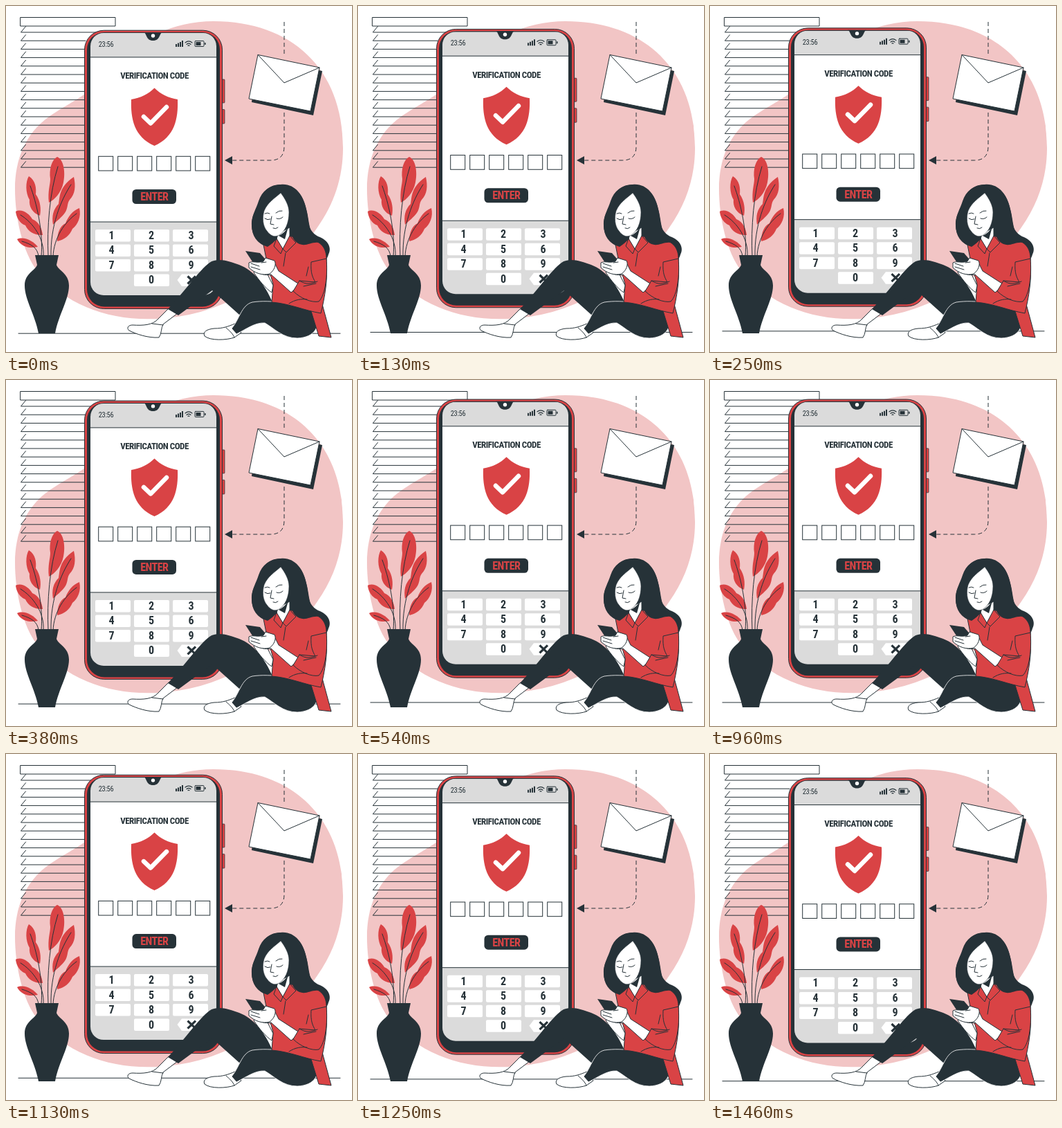
Recreate the animation shown at these times as an HTML page. Size 500 by 500 pixels, loop 1.5 s.

```html
<!DOCTYPE html>
<html lang="en">
<head>
<meta charset="utf-8">
<title>Verification code</title>
<style>
  html, body { margin: 0; width: 100%; height: 100%; overflow: hidden; background: #fff; }
  svg { display: block; width: 100vw; height: 100vh; }
  text { font-family: "Roboto Condensed", "Open Sans Condensed", "Noto Sans Condensed", Roboto, sans-serif; font-stretch: 75%; font-weight: 600; text-anchor: middle; fill: #263238; }
  .line { fill: none; stroke: #263238; stroke-linecap: round; stroke-linejoin: round; }
  .skin { fill: #fff; stroke: #263238; stroke-linejoin: round; }
  .red { fill: #d94345; }
  .dark { fill: #263238; }
  .white { fill: #fff; }
  .grey { fill: #dbdbdb; }
  .edge { stroke: #263238; }
</style>
</head>
<body>
<svg viewBox="0 0 500 500">
  <defs>
    <clipPath id="screen"><rect x="122" y="39" width="182" height="379" rx="19"/></clipPath>
  </defs>

  <path fill="#f2c5c5" d="M13 264C13 222 28 184 62 160C92 139 126 126 158 88C192 48 240 22 300 22C412 22 487 90 487 205C487 248 474 286 450 320C408 381 330 440 240 450C164 460 92 438 46 384C24 356 13 306 13 264Z"/>

  <g class="line">
    <path id="slats"/>
    <rect x="21" y="16.500" width="137" height="12.500" class="white"/>
  </g>

  <g id="floating">
    <path class="line" d="M18 473.200H483"/>
    <g class="red edge">
      <g stroke-width=".7">
        <rect x="308" y="106" width="8" height="34" rx="1"/>
        <rect x="308" y="149.500" width="8" height="20.500" rx="1"/>
      </g>
      <rect x="113.500" y="35.200" width="199" height="402.300" rx="28"/>
    </g>
    <rect class="dark" x="117" y="38" width="192" height="396.500" rx="25"/>
    <g clip-path="url(#screen)">
      <rect class="grey" x="122" y="39" width="182" height="380"/>
      <rect class="white edge" x="121" y="74" width="184" height="238"/>
    </g>
    <path class="dark" d="M199 38C204 40 202 50 212.500 50S221 40 226 38Z"/>
    <circle class="white" cx="212.500" cy="43" r="2.700"/>
    <text x="144.500" y="59" font-size="10.500" letter-spacing="-.3" style="font-weight:400">23:56</text>
    <path class="line" stroke-width="2" style="stroke-linecap:butt" d="M246 59v-4M249 59v-5.500M252 59v-7M255 59v-9"/>
    <path class="line" stroke-width="1.200" d="M259 53q5-4 10 0M261 55.500q3-2.500 6 0M263 57.500q1-1 2 0"/>
    <rect class="line" x="273" y="50.500" width="13" height="8" rx="1"/>
    <path class="dark" d="M274.500 52h7v5h-7zM287 53h1.500v3H287z"/>

    <text x="214.500" y="105.500" font-size="13" letter-spacing="-.5">VERIFICATION CODE</text>
    <path class="red" d="M214.500 118.500C206 127 194 133 181 135C180 163 185 189 214.500 202C244 189 249 163 248 135C235 133 223 127 214.500 118.500Z"/>
    <path d="M199 160L209 169.500L232 146" fill="none" stroke="#fff" stroke-width="6.500" stroke-linecap="round" stroke-linejoin="round"/>
    <g id="digits" class="white edge"></g>
    <rect class="dark" x="182.500" y="265" width="63.500" height="21" rx="5.500"/>
    <text x="214.300" y="281" font-size="16" letter-spacing="-.5" style="fill:#d94345">ENTER</text>
    <g id="keys"></g>
    <path class="white" d="M247.500 396L254 387.500H290q2 0 2 2V403q0 2-2 2H254Z"/>
    <path d="M262.500 390.500l11.500 11M274 390.500l-11.500 11" stroke="#263238" stroke-width="3.200"/>
  </g>

  <!-- Message -->
  <path class="line" stroke-dasharray="6 4" style="stroke-linecap:butt" d="M402 23V72M402 154V203Q402 223 382 223H326"/>
  <path class="dark" d="M316 223L327 217V229Z"/>
  <path class="dark" d="M364 71L457 94L444 158L355 139Z"/>
  <path class="skin" d="M364 70.500L453 89L440 152L351 134Z"/>
  <path class="line" d="M364 70.500L402 111L453 89"/>

  <!-- Plant -->
  <g class="red">
    <path d="M74 218C84 222 86 242 83 255C80 270 70 280 62 284C60 268 64 258 64 250C62 236 66 222 74 218Z"/>
    <path d="M33 246C43 252 44 264 43 272C50 282 51 294 49 303C38 299 33 290 34 280C28 270 28 254 33 246Z"/>
    <path d="M98 247C101 260 100 272 92 280C88 285 90 292 85 299C80 306 74 310 68 316C66 304 68 294 76 286C78 276 76 262 98 247Z"/>
    <path d="M14 297C22 292 34 300 38 308C48 312 52 322 53 331C42 332 32 326 28 317C20 314 15 306 14 297Z"/>
    <path d="M106 292C109 304 104 316 96 322C92 332 84 338 74 340C74 328 78 318 86 314C90 304 96 296 106 292Z"/>
    <path d="M16 337C26 332 40 340 46 348C34 351 22 348 16 337Z"/>
  </g>
  <path class="line" d="M61 362C59 320 63 270 75 232M51 362C54 325 44 284 35 260M65 362C64 317 79 281 94 258M54 362C56 336 39 313 21 302M68 362C69 335 85 312 102 300M47 362C46 349 36 344 23 340"/>
  <path class="dark" d="M42 360H76L73 374C75 382 91 386 91 404C91 424 76 446 71 473H47C42 446 27 424 27 404C27 386 43 382 45 374Z"/>

  <!-- Legs and shoes -->
  <path class="skin" d="M235 437L219 453C212 461 198 462 183 461C176 461 174 466 178 469C188 474 205 480 221 479C225 474 224 465 227 460L248 444Z"/>
  <path class="line" d="M211 459L227 461"/>
  <path class="dark" d="M234 438C257 414 278 383 294 371C306 363 322 369 337 374C358 382 374 402 386 430L337 446L298 411L249 447Z"/>
  <path class="skin" d="M331 459C321 463 314 466 301 466C290 467 284 471 287 477C295 484 319 483 330 479L340 472Z"/>
  <path class="line" d="M318 465C323 469 329 475 330 479"/>
  <path d="M326 466C337 454 340 432 356 428C382 424 419 430 447 440C456 462 447 479 421 480C400 480 388 466 374 458C360 457 347 467 333 474Z" fill="#263238" stroke="#fff" stroke-width=".8"/>

  <!-- Upper body -->
  <path class="red edge" d="M440 438L452 477L470 479L457 431Z"/>
  <path class="dark" d="M397 258C417 256 430 273 434 294C438 311 435 324 451 333C466 338 471 350 466 359C464 367 459 371 452 370L405 357L378 348C363 344 354 330 355 312C357 299 361 294 365 282C370 267 381 259 397 258Z"/>
  <path class="red edge" d="M372 345C386 338 396 334 407 332L441 338C458 341 464 353 463 369C465 395 461 420 455 444C431 440 410 430 384 428L386 402L377 370Z"/>
  <path class="skin" d="M393 329L410 320V332C410 338 403 344 400 352C397 348 393 341 391 337Z"/>
  <path class="dark" d="M394 332Q403 328 408 319L403 337Z"/>
  <path class="red edge" d="M391 336L400 351L397 358L387 347ZM410 332L419 342L405 356L400 351Z"/>
  <path class="dark" d="M397 258C376 258 368 274 364 288C360 297 355 303 355 316C355 333 363 343 378 348C384 344 388 340 391 337L378 322L400 272Z"/>
  <path class="dark" d="M396 259L409 299C409 320 411 338 424 344C434 348 442 340 452 342C437 332 439 311 434 294C429 270 415 257 396 259Z"/>
  <path class="skin" stroke-width=".6" d="M397 270C388 278 378 284 373 296C370 306 371 318 377 325C382 332 388 335 395 331C403 326 409 314 409 298C409 288 403 278 397 270Z"/>
  <path class="line" d="M374 307q4 3 8 1M391 307q5 2 9-2M384 304L382 315L387 316M386 321q4 2 7-1M374 300q4-2 7 0M390 299q5-4 9-3"/>

  <!-- Arms and handset -->
  <path class="skin" d="M361 379L376 384L386 404L384 414C375 408 366 397 358 385Z"/>
  <path class="skin" d="M373 371C380 365 388 367 390 375L394 383L425 403L412 414L383 388C375 390 365 387 363 382Z"/>
  <path class="red edge" d="M424 397L415 412C426 423 442 429 452 427C462 417 465 388 463 365L441 370C440 386 443 392 447 399Z"/>
  <path class="line" d="M424 397C434 403 440 402 450 398M430 405L448 401M404 357L401 376M437 377L434 390M409 430C418 424 427 423 435 424"/>
  <path class="dark" d="M346 354L367 357L379 371L357 371Z"/>
  <path class="skin" d="M351 371C357 368 363 372 372 369L375 364L388 368C391 373 388 382 381 387C371 390 359 386 351 378Z"/>
  <path class="line" d="M354 372L366 376M354 377L367 381M369 371L376 370"/>
</svg>
<script>
  const $ = id => document.getElementById(id);
  const PERIOD = 1500, LIFT = 10;

  let slats = "";
  for (let i = 0; i < 17; i++) slats += `M28.500 ${29.5 + i * 12.2}l-7 8.500H${i ? 115 : 157}`;
  $("slats").setAttribute("d", slats);

  for (let i = 0; i < 6; i++)
    $("digits").innerHTML += `<rect x="${133.7 + i * 28}" y="217.300" width="21" height="20.700"/>`;

  [..."1234567890"].forEach((digit, i) => {
    const col = i < 9 ? i % 3 : 1, row = Math.floor(i / 3);
    const x = 129 + col * 56, y = 323 + row * 21.5;
    $("keys").innerHTML += `<rect class="white" x="${x}" y="${y}" width="51" height="17.500" rx="2"/>
      <text x="${152.5 + col * 57.5}" y="${y + 14}" font-size="16">${digit}</text>`;
  });

  // The phone and the floor rise and sink at a steady speed.
  function draw(now) {
    const phase = now % PERIOD / PERIOD;
    const lift = LIFT * (1 - Math.abs(1 - 2 * phase));
    $("floating").setAttribute("transform", `translate(0 ${-lift})`);
    requestAnimationFrame(draw);
  }
  draw(performance.now());
</script>
</body>
</html>
```
